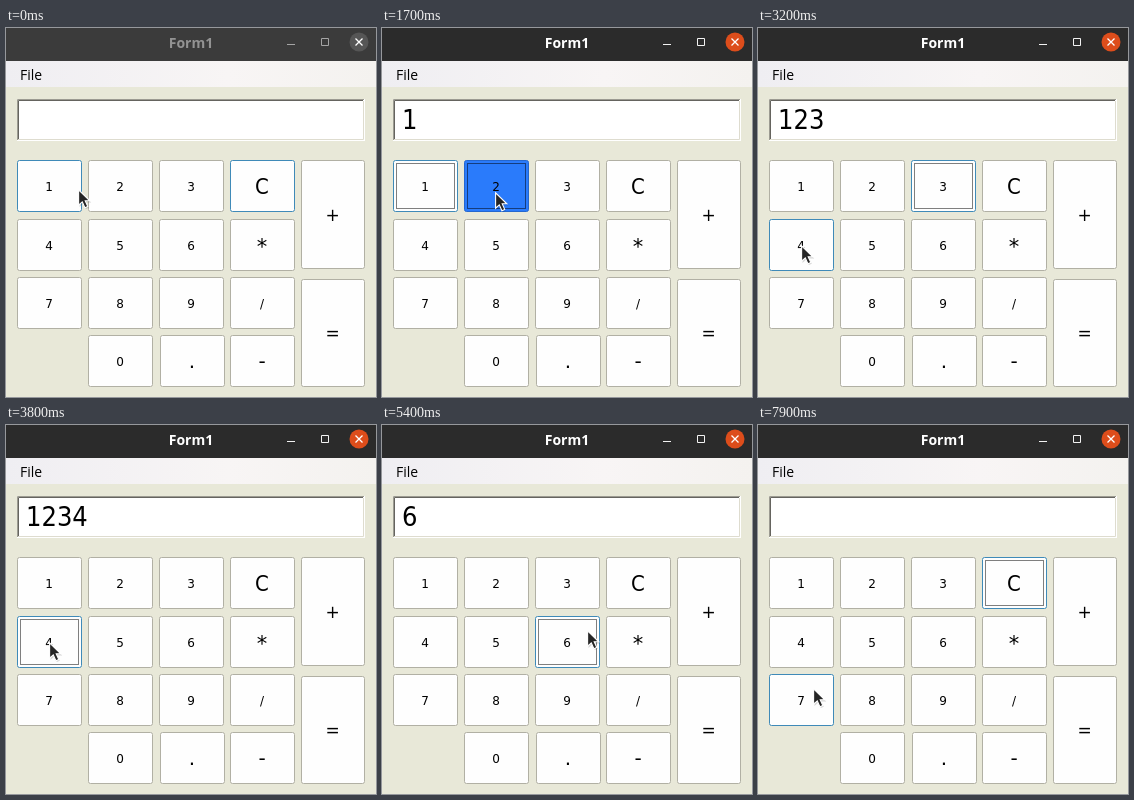
An HTML page that plays this animation: 370x369 px, repeating every 8000 ms.

```html
<!DOCTYPE html>
<html lang="en">
<head>
<meta charset="utf-8">
<title>Calculator</title>
<style>
  html, body { margin: 0; width: 100%; height: 100%; overflow: hidden; background: #e8e8d8; }
  svg { display: block; width: 370px; height: 369px; }
  text { font-family: "DejaVu Sans", sans-serif; fill: #000; }
  .ui { font-family: "Open Sans", "Noto Sans", sans-serif; }
  .big { font-family: "DejaVu Sans Condensed", "DejaVu Sans", sans-serif; font-stretch: condensed; }
  .bar { fill: #2b2b2b; }
  .title { font-weight: 700; font-size: 14px; fill: #fff; }
  .icon { fill: none; stroke: #f2f2f2; }
  .close { fill: #dd4d1b; }
  .idle .bar { fill: #3b3b3b; }
  .idle .title { fill: #939393; }
  .idle .icon { stroke: #a5a5a5; }
  .idle .close { fill: #565656; }
  .key rect { fill: #fefefe; stroke: #b1b0a4; }
  .key .ring { fill: none; stroke: none; stroke-dasharray: 1 1; }
  .key.hot .face, .key.focus .face { stroke: #3f8ab8; }
  .key.focus .ring { stroke: #000; }
  .key.press .face { fill: #2a7bfb; stroke: #2467cf; }
  .idle .ring { visibility: hidden; }
</style>
</head>
<body>
<svg id="win" viewBox="0 0 370 369">
  <defs>
    <linearGradient id="menu">
      <stop offset="0" stop-color="#efeef2"/>
      <stop offset=".6" stop-color="#f8f5f5"/>
      <stop offset="1" stop-color="#f4f2ef"/>
    </linearGradient>
  </defs>
  <rect width="370" height="369" fill="#e8e8d8"/>
  <rect class="bar" width="370" height="33"/>
  <text class="ui title" x="185" y="20" text-anchor="middle">Form1</text>
  <path class="icon" d="M281 16.5h8M315.500 10.500h7v7h-7z"/>
  <circle class="close" cx="353" cy="14" r="9.500"/>
  <path d="M349.500 10.500l7 7m0-7l-7 7" stroke="#fff" stroke-width="1.300"/>
  <rect y="33" width="370" height="26" fill="url(#menu)"/>
  <text class="ui" x="14" y="52" font-size="14">File</text>
  <rect x="11" y="71" width="348" height="42" fill="#fff"/>
  <path d="M11.500 112V71.500H358" fill="none" stroke="#9c9b92"/>
  <path d="M12.500 111V72.500H357" fill="none" stroke="#65645f"/>
  <path d="M12 111.500H357.500V73" fill="none" stroke="#dedccf"/>
  <text id="out" class="big" x="20" y="101" font-size="27"></text>
  <g id="keys"></g>
  <g id="mouse">
    <path d="M1.500 2v16l3.800-3.400 2.500 5.400 3-1.300-2.500-5.300h5z" fill="#000" opacity=".16"/>
    <path d="M.6 .8V16.200L4.300 12.900 6.900 18.700 9.700 17.400 7.200 11.800H11.800z" fill="#252525" stroke="#fff" stroke-width="1.100"/>
  </g>
</svg>
<script>
const NS = 'http://www.w3.org/2000/svg';
const $ = id => document.getElementById(id);
const keys = {};

function add(parent, tag, attrs) {
  const el = document.createElementNS(NS, tag);
  for (const k in attrs) el.setAttribute(k, attrs[k]);
  return parent.appendChild(el);
}

// Baseline is given relative to the middle of the key.
function addKey(name, x, y, w, h, size, drop) {
  const g = add($('keys'), 'g', { class: 'key' });
  add(g, 'rect', { class: 'face', x: x + .5, y: y + .5, width: w - 1, height: h - 1, rx: 2 });
  add(g, 'rect', { class: 'ring', x: x + 3.5, y: y + 3.5, width: w - 7, height: h - 7 });
  const label = add(g, 'text', {
    x: x + w / 2 - .5, y: y + h / 2 + drop, 'font-size': size, 'text-anchor': 'middle'
  });
  if (name === 'C') label.setAttribute('class', 'big');
  label.textContent = name;
  keys[name] = g;
}

const cols = [11, 82, 153, 224], rows = [132, 191, 249, 307];
for (let n = 1; n <= 9; n++)
  addKey(String(n), cols[(n - 1) % 3], rows[Math.floor((n - 1) / 3)], 65, 52, 12, 5);
addKey('0', 82, 307, 65, 52, 12, 5);
addKey('.', 154, 307, 65, 52, 20, 7);
addKey('C', 224, 132, 65, 52, 22, 8);
addKey('*', 224, 191, 65, 52, 21, 9);
addKey('/', 224, 249, 65, 52, 12, 5);
addKey('-', 224, 307, 65, 52, 20, 7);
addKey('+', 295, 132, 64, 109, 17, 6);
addKey('=', 295, 251, 64, 108, 17, 6);

// time, pointer x, pointer y, hot key, focused key, pressed key, display
const steps = [
  [0, 72, 161, '1', 'C', '', ''],
  [600, 54, 155, '1', 'C', '', ''],
  [700, 40, 150, '1', 'C', '', ''],
  [900, 40, 150, '1', 'C', '', ''],
  [1000, 40, 150, '1', '1', '1', ''],
  [1100, 40, 150, '1', '1', '', '1'],
  [1500, 113, 163, '2', '1', '', '1'],
  [1700, 113, 164, '2', '12', '2', '1'],
  [1900, 113, 164, '2', '2', '2', '1'],
  [2000, 113, 164, '2', '2', '', '12'],
  [2300, 177, 158, '3', '2', '', '12'],
  [2700, 177, 158, '3', '3', '', '123'],
  [3000, 157, 168, '3', '3', '', '123'],
  [3100, 92, 199, '5', '3', '', '123'],
  [3200, 43, 217, '4', '3', '', '123'],
  [3400, 43, 217, '4', '4', '4', '123'],
  [3800, 43, 217, '4', '4', '', '1234'],
  [3900, 107, 214, '5', '4', '', '1234'],
  [4200, 107, 214, '5', '5', '5', '1234'],
  [4300, 107, 214, '5', '5', '', '12345'],
  [4600, 128, 211, '5', '5', '', '12345'],
  [4700, 176, 206, '6', '5', '', '12345'],
  [4800, 205, 205, '6', '5', '', '12345'],
  [5400, 205, 205, '6', '6', '', '6'],
  [6100, 226, 192, '', '6', '', '6'],
  [6200, 277, 158, 'C', '6', '', '6'],
  [6300, 274, 149, 'C', '6', '', '6'],
  [7200, 274, 149, 'C', 'C', '', ''],
  [7500, 252, 163, 'C', 'C', '', ''],
  [7600, 181, 207, '6', 'C', '', ''],
  [7700, 116, 237, '8', 'C', '', ''],
  [7900, 55, 263, '7', 'C', '', '']
];

let shown = null;
function show(step) {
  const [t, x, y, hot, focus, press, text] = step;
  $('win').classList.toggle('idle', t < 900);
  $('mouse').setAttribute('transform', `translate(${x} ${y})`);
  $('out').textContent = text;
  for (const name in keys) {
    const c = keys[name].classList;
    c.toggle('hot', name === hot);
    c.toggle('focus', focus.includes(name));
    c.toggle('press', name === press);
  }
}

const start = performance.now();
function tick() {
  const t = Math.max(0, performance.now() - start) % 8000;
  const step = steps.findLast(s => s[0] <= t);
  if (step !== shown) show(shown = step);
  requestAnimationFrame(tick);
}
tick();
</script>
</body>
</html>
```
